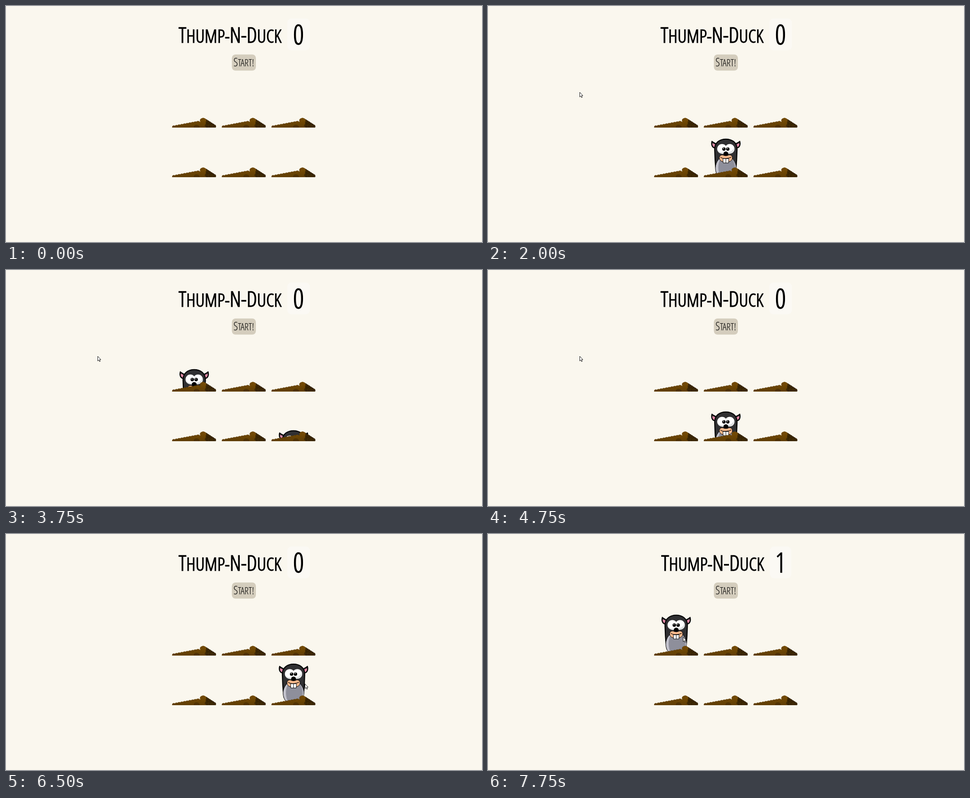
Recreate the animation shown at these times as an HTML page. Size 1061 by 528 pixels, loop 8 s.

```html
<!DOCTYPE html>
<html lang="en">
<head>
<meta charset="utf-8">
<title>Thump-N-Duck</title>
<style>
  html, body { margin: 0; height: 100%; overflow: hidden; background: #faf7ee; }
  svg { display: block; width: 1061px; height: 528px; }
  text {
    font-family: "Open Sans Condensed Light", "Roboto Condensed", "Open Sans Condensed", "Noto Sans", sans-serif;
    font-stretch: 62.5%;
    font-weight: 300;
  }
  tspan { font-size: .86em; }
  .bold { stroke: #000; stroke-width: 1.4; }
</style>
</head>
<body>
<svg viewBox="0 0 1061 528">
  <defs>
    <clipPath id="hole"><rect x="-60" y="-111" width="120" height="111"/></clipPath>
    <linearGradient id="soil" x1="0" y1="-22" x2="0" y2="0" gradientUnits="userSpaceOnUse">
      <stop stop-color="#794e05"/><stop offset="1" stop-color="#5f3d03"/>
    </linearGradient>

    <g id="ear" stroke="#000" stroke-width="2" stroke-linejoin="round">
      <path d="M-31 6C-33 13-31 20-25 21L-20 13C-24 10-28 9-31 6Z" fill="#303032"/>
      <path d="M-29.5 11C-30 15-28 18-25 19L-23 14Z" fill="#e58aa8" stroke="#e58aa8" stroke-width="1"/>
    </g>

    <g id="mole">
      <use href="#ear"/>
      <use href="#ear" transform="scale(-1 1)"/>
      <path d="M-21 76Q-23.5 62-24 48L-25 24C-25 8-13 1.2 0 1.2S25 8 25 24L24 48Q23.5 62 21 76Z"
            fill="#303032" stroke="#000" stroke-width="2.2"/>
      <ellipse cy="66" rx="23.3" ry="27" fill="#c2c2cc" stroke="#000"/>
      <path d="M-9 41C-20 54-19 77-9 91C10 98 23 82 23 66C23 51 8 34-9 41Z" fill="#8e8f9b"/>
      <path d="M15 49C22 60 21 77 13 88C26 77 26 58 15 49Z" fill="#a5a6b1"/>
      <g fill="#fff">
        <circle cx="-8.5" cy="23" r="10.8"/><circle cx="8.5" cy="23" r="10.8"/>
      </g>
      <path d="M-18 27Q-11 33-2 31L0 34Q-13 37-18 27ZM18 18Q16 30 3 31L0 34Q20 36 18 18Z" fill="#dcdfe0"/>
      <path d="M-14.5 43C-14.5 37-8 35-4 38H4C8 35 14.5 37 14.5 43C14.5 50 8 52.5 0 52.5S-14.5 50-14.5 43Z"
            fill="#f9b98c" stroke="#000"/>
      <path d="M-12 41.5Q-8 45 0 44.5T12 41.5" fill="none" stroke="#000" stroke-width="1.2"/>
      <path d="M-6.5 45H6.5L6 54.5H-6ZM0 45V54.5" fill="#fff" stroke="#000"/>
      <circle cx="-4.3" cy="23.5" r="3.8"/><circle cx="4.3" cy="23.5" r="3.8"/>
      <ellipse cy="34" rx="5.3" ry="5"/>
      <g fill="#fff">
        <circle cx="-5" cy="22" r="1"/><circle cx="3.6" cy="22" r="1"/>
      </g>
    </g>

    <g id="mound" clip-path="url(#hole)"></g>
  </defs>

  <text id="title" class="bold" y="65" data-size="62" data-width="229">T<tspan>HUMP-</tspan>N-D<tspan>UCK</tspan></text>
  <rect id="box" y="28" height="71" rx="9" fill="#fbf9f4"/>
  <text id="score" class="bold" x="652" y="65" text-anchor="middle" data-size="60" data-width="30">0</text>
  <rect x="503.5" y="108.5" width="53.5" height="36" rx="8" fill="#d4cdbd"/>
  <text x="530" y="126.5" text-anchor="middle" data-size="30" data-width="46">S<tspan>TART!</tspan></text>
  <g id="field"></g>
  <path id="cursor" d="M0 0V10.5L2.3 8.3 4 12 5.6 11.2 4 7.6H7Z" fill="#fff" stroke="#000" stroke-width=".9"/>
</svg>

<script>
const $ = id => document.getElementById(id);
const LOOP = 8000, STEP = 250, DEPTH = 111, RISE = 400;
const FIRST = 762, BEAT = 949, HIT = 7000, HIT_HOLE = 5;

// The hole that is occupied in each beat
const tour = [2, 4, 5, 0, 4, 5, 5, 0];
// Time, x, y
const pointer = [[1000, 529, 124], [1500, 204.5, 193], [4750, 204.5, 193], [5750, 577, 308.5],
  [6000, 690, 335], [7000, 643, 335.5], [7750, 435, 230.5]];

const clamp = v => Math.max(0, Math.min(1, v));
const mix = (a, b, k) => a + (b - a) * k;
const ease = k => 1 - (1 - clamp(k)) ** 2.2;

// A row of overlapping soil lumps, placed by a rule
const lumps = (count, fill, line, place) => Array.from({ length: count }, (_, i) => {
  const [x, y, r] = place(i);
  return `<circle cx="${x}" cy="${y}" r="${r}" fill="${fill}" stroke="${line}" stroke-width=".5"/>`;
}).join("");

$("mound").innerHTML =
  `<path d="M20 0V-16H26L46 0Z" fill="#3d2803"/>` +
  lumps(6, "#3d2803", "#241700", i => [26 + 3.7 * i, -14.5 + 2.4 * i, 4]) +
  lumps(3, "#3d2803", "#241700", i => [27 + 6 * i, -5 + i, 5]) +
  lumps(10, "url(#soil)", "#4f3203", i => [-45.5 + 6 * i, -1 - .9 * i, 3.5 + .22 * i]) +
  lumps(3, "url(#soil)", "#5a3a03", i => [17.5 + 2.5 * i, -16 - i % 2, 4.5]) +
  `<path d="M-47 0L-23-5 4-10 12-9 14-16H25.5L26-9 23-4 27 0Z" fill="url(#soil)"/>
   <path d="M0 0Q-1-5 4-5.5T11-3V0Z" fill="#513303" stroke="#3d2803" stroke-width=".7"/>`;

const moles = Array.from({ length: 6 }, (_, i) => {
  $("field").insertAdjacentHTML("beforeend",
    `<g transform="translate(${419.5 + i % 3 * 110.7} ${i < 3 ? 272 : 383})">
       <g clip-path="url(#hole)"><use href="#mole"/></g><use href="#mound"/></g>`);
  return $("field").lastElementChild.querySelector("use");
});

// Largest font size that keeps a label inside its space, centred on its y
for (const label of document.querySelectorAll("text")) {
  const { size, width } = label.dataset;
  label.style.fontSize = size + "px";
  const fitted = Math.min(size, size * width / label.getComputedTextLength());
  label.style.fontSize = fitted + "px";
  label.setAttribute("y", +label.getAttribute("y") + fitted * .357);
}

function sunk(hole, t) {
  let depth = DEPTH;
  tour.forEach((next, i) => {
    const k = ease((t - FIRST - i * BEAT) / RISE);
    depth = mix(depth, hole === next ? 0 : DEPTH, k);
  });
  return hole === HIT_HOLE ? mix(depth, DEPTH, ease((t - HIT) / RISE)) : depth;
}

function pointerAt(t) {
  let [, x, y] = pointer[0];
  for (let i = 1; i < pointer.length; i++) {
    const [start] = pointer[i - 1], [end, nextX, nextY] = pointer[i];
    const k = clamp((t - start) / (end - start));
    x = mix(x, nextX, k);
    y = mix(y, nextY, k);
  }
  return [x, y];
}

function draw(now) {
  const t = Math.floor(now % LOOP / STEP) * STEP;
  const score = t >= HIT ? 1 : 0;
  moles.forEach((mole, i) => mole.setAttribute("y", sunk(i, t) - 93));
  $("score").textContent = score;
  $("title").setAttribute("x", 385 + score * 1.5);
  $("box").setAttribute("x", 627 + score * 1.5);
  $("box").setAttribute("width", 50.5 - score * 3);
  $("cursor").setAttribute("transform", `translate(${pointerAt(t)})`);
  $("cursor").style.display = t < STEP ? "none" : "";
  requestAnimationFrame(draw);
}
requestAnimationFrame(draw);
</script>
</body>
</html>
```
